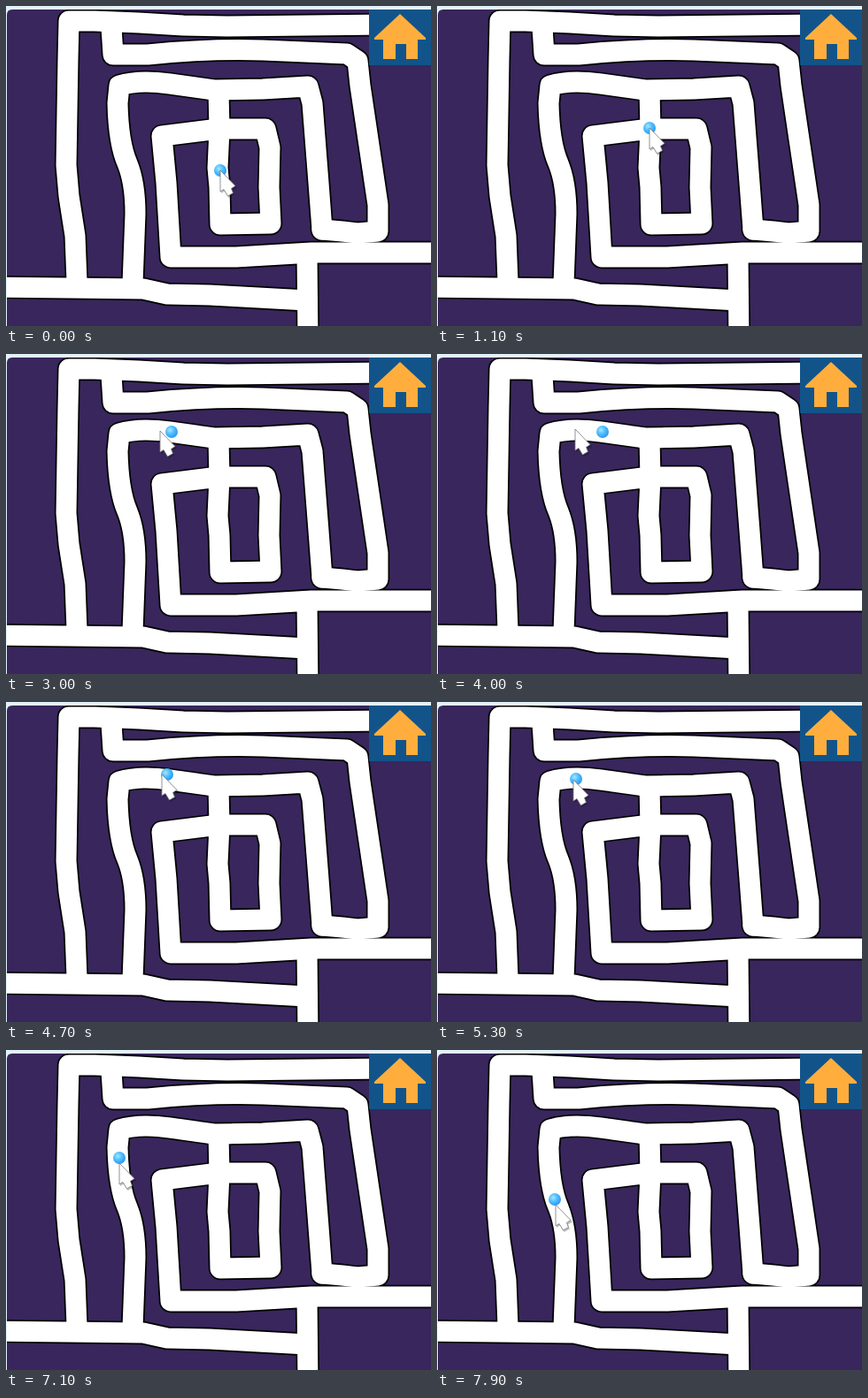
An HTML page that plays this animation: 480 by 362 pixels, repeating every 8000 ms.

```html
<!DOCTYPE html>
<html lang="en">
<head>
<meta charset="utf-8">
<title>Maze</title>
<style>
  html, body { margin: 0; width: 100%; height: 100%; overflow: hidden; background: #e3f3fb; }
  svg { display: block; width: 100%; height: 100%; }
  .corridors { fill: none; stroke-linejoin: round; stroke-linecap: round; }
</style>
</head>
<body>
<svg viewBox="0 0 480 362">
  <defs>
    <clipPath id="board"><path d="M1 370V10Q1 4 7 4H490V370Z"/></clipPath>
    <radialGradient id="blue" cx=".38" cy=".36" r=".7">
      <stop offset="0" stop-color="#a8e6ff"/>
      <stop offset=".45" stop-color="#50c0ff"/>
      <stop offset="1" stop-color="#2a92f0"/>
    </radialGradient>
    <g id="maze">
      <!-- outer left and top -->
      <path d="M80 312 78 260 71 215 68 180 70 60 71 17 100 17 150 19 200 22 250 23 430 21"/>
      <!-- second ring, down the right side -->
      <path d="M119 24 121 55 160 55Q230 48 290 50L385 54 397 62 400 90 420 225 420 255 397 257 380 255 357 253"/>
      <!-- third ring -->
      <path d="M143 314 146 235Q146 200 137 178 127 155 126 110L128 90Q150 83 185 88L235 95 290 94 341 91 346 110 353 200 357 253"/>
      <!-- spiral -->
      <path d="M240 96 241 140 239 183 241 205 242 247 299 246 297 205 298 160 293 139 240 139 176 147 181 200 186 284 260 284 345 279 490 279"/>
      <!-- bottom -->
      <path d="M-10 318 70 319 155 320 182 326 230 327 340 333"/>
      <path d="M340 280 341 380"/>
    </g>
  </defs>

  <g clip-path="url(#board)">
    <path fill="#38265c" d="M0 0H480V362H0Z"/>
    <use class="corridors" href="#maze" stroke="#000" stroke-width="26.4"/>
    <use class="corridors" href="#maze" stroke="#fff" stroke-width="23"/>
  </g>

  <path fill="#12548a" d="M410 4H480V67H410Z"/>
  <path fill="#ffae3d" d="M445 9 474 36V38H465V60H452V43H440V60H426V38H416V36Z"/>

  <circle id="ball" r="7" fill="url(#blue)"/>
  <g id="cursor">
    <path fill="#000" opacity=".25" d="M1 2V26L5 23.5 9.5 31 16 27.5 14 22.5 19 19.5Z"/>
    <path fill="#fff" stroke="#777" stroke-width=".8" stroke-linejoin="round"
      d="M0 0V24L4 21.5 8.5 29 14.5 25.5 12.5 20.5 17 17.5Z"/>
  </g>
</svg>
<script>
  const LOOP = 8000, STEP = 100;
  const LAG = 100;                                 // the dragged ball trails the cursor
  const RELEASE = 2400, JUMP = 3000, GRAB = 4600;
  const PARKED = [187, 88];

  // Cursor moves: begin, end, x, y. The cursor rests between moves.
  const moves = [
    [200, 1000, 240, 138],
    [1100, 1900, 241, 97],
    [2000, 2400, 222, 93],
    [2900, 3000, 174, 87],
    [3100, 3400, 165, 86],
    [3600, 3800, 150, 85],
    [3900, 4500, 187, 82],
    [4500, 4800, 171, 82],
    [4800, 5300, 154, 88],
    [5300, 5500, 143, 87],
    [5700, 5900, 137, 91],
    [6000, 6300, 127, 95],
    [6300, 6900, 127, 116],
    [6900, 7900, 134, 175]
  ];

  function cursorAt(time) {
    let x = 242, y = 186;
    for (const [begin, end, toX, toY] of moves) {
      const part = Math.min(1, Math.max(0, (time - begin) / (end - begin)));
      x += (toX - x) * part;
      y += (toY - y) * part;
    }
    return [Math.round(x), Math.round(y)];
  }

  function ballAt(time) {
    if (time >= JUMP && time < GRAB) return PARKED;
    return cursorAt((time < JUMP ? Math.min(time, RELEASE) : time) - LAG);
  }

  const place = (id, [x, y]) =>
    document.getElementById(id).setAttribute("transform", `translate(${x} ${y})`);

  const start = performance.now();
  function draw() {
    const elapsed = (performance.now() - start) % LOOP;
    const time = Math.floor(elapsed / STEP) * STEP;
    place("ball", ballAt(time));
    place("cursor", cursorAt(time));
    requestAnimationFrame(draw);
  }
  draw();
</script>
</body>
</html>
```
